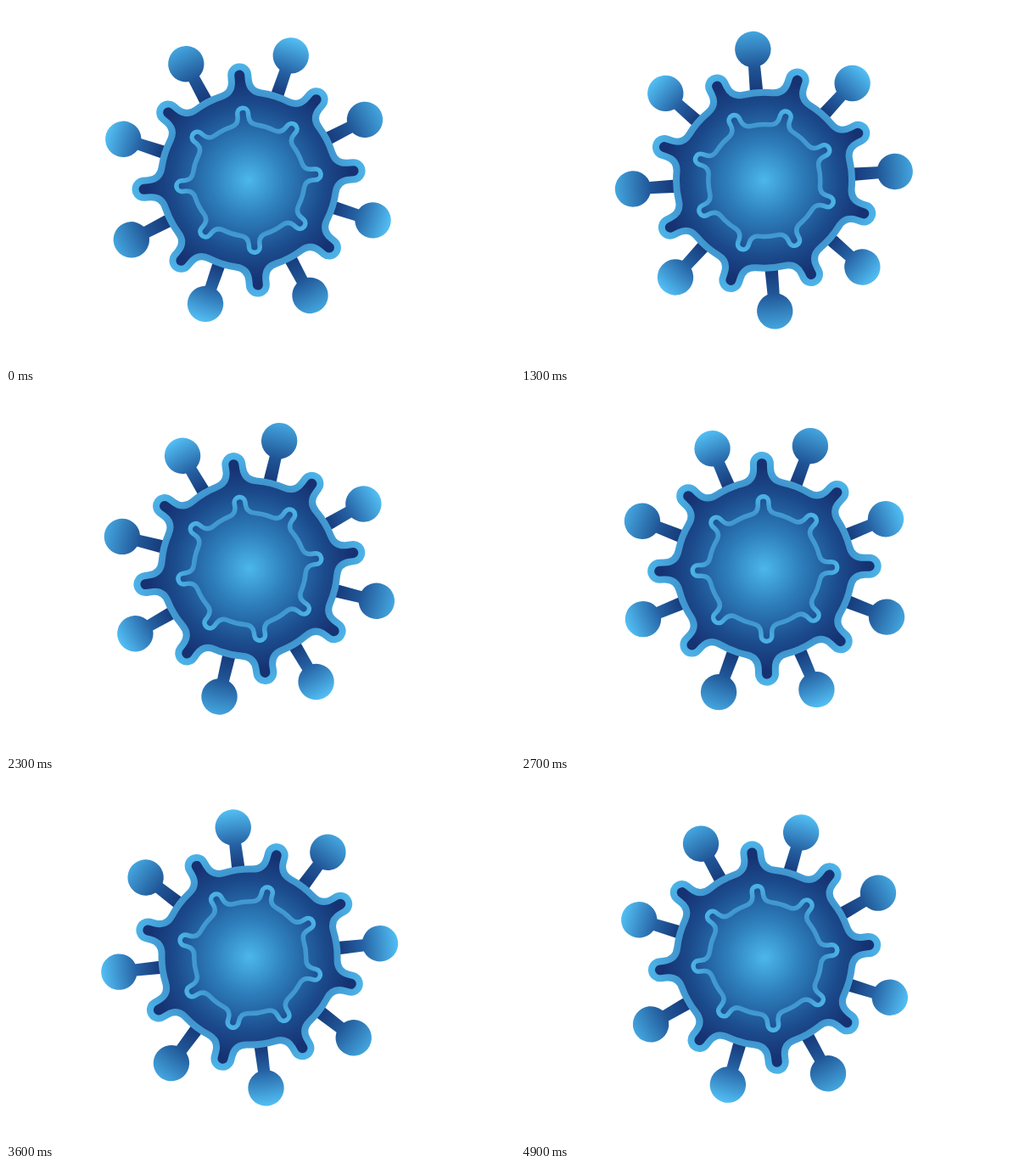
An HTML page that plays this animation: 600 by 424 pixels, repeating every 5 s.

```html
<!DOCTYPE html>
<html lang="en">
<head>
<meta charset="utf-8">
<title>Turning virus</title>
<style>
html, body { margin: 0; width: 100%; height: 100%; overflow: hidden; background: #fff; }
svg { display: block; width: 100vw; height: 100vh; }
</style>
</head>
<body>
<svg viewBox="0 0 600 424">
  <defs>
    <radialGradient id="bright" gradientUnits="userSpaceOnUse" cx="0" cy="0" r="176">
      <stop offset=".6" stop-color="#173a7a"/>
      <stop offset=".76" stop-color="#2561a3"/>
      <stop offset="1" stop-color="#53c0f5"/>
    </radialGradient>
    <radialGradient id="deep" gradientUnits="userSpaceOnUse" cx="0" cy="0" r="176">
      <stop offset=".6" stop-color="#173a7a"/>
      <stop offset=".76" stop-color="#205596"/>
      <stop offset="1" stop-color="#44a6df"/>
    </radialGradient>
    <radialGradient id="core" gradientUnits="userSpaceOnUse" cx="0" cy="0" r="120">
      <stop offset="0" stop-color="#4cb7eb"/>
      <stop offset=".37" stop-color="#2d7dba"/>
      <stop offset=".75" stop-color="#1b4a8b"/>
      <stop offset="1" stop-color="#163273"/>
    </radialGradient>
    <radialGradient id="rim" gradientUnits="userSpaceOnUse" cx="0" cy="0" r="138">
      <stop offset=".72" stop-color="#4095ce"/>
      <stop offset="1" stop-color="#4db4e9"/>
    </radialGradient>
  </defs>
  <g id="knobs"></g>
  <g id="body"><path fill="url(#core)" stroke="url(#rim)" stroke-width="8" stroke-linejoin="round"/></g>
  <g id="ring"><path transform="scale(.637)" fill="none" stroke="url(#rim)" stroke-width="8.6" stroke-linejoin="round"/></g>
</svg>
<script>
const LOOP = 5000, STEP = 100, TURN = 90;
const SPIKE_START = -5;
const TIP = 10, VALLEY = 103.5;
const KNOBS = [[-28.2, "deep"], [19, "bright"], [62.8, "deep"], [108, "bright"]];

// Each layer turns about a pivot slightly away from its own centre.
const layers = [
  { id: "knobs", pivot: [284.45, 207.15], offset: [0.95, -2.55], start: 0 },
  { id: "body", pivot: [285.7, 206.35], offset: [0.35, -1.35], start: SPIKE_START },
  { id: "ring", pivot: [285.8, 207.3], offset: [0.2, -2.1], start: SPIKE_START }
];
for (const layer of layers) layer.el = document.getElementById(layer.id);

// Eight round-ended spikes joined by shallow arcs.
function spikyPath() {
  const arc = r => `A${r} ${r} 0 0 1 `;
  let d = "";
  for (let k = 0; k < 8; k++) {
    const a = k * Math.PI / 4, c = Math.cos(a), s = Math.sin(a);
    const at = (x, y) => (x * c + y * s).toFixed(2) + " " + (x * s - y * c).toFixed(2) + " ";
    d += (k ? arc(VALLEY) : "M") + at(-23.6, 100.8);
    d += "C" + at(-15.2, 102.8) + at(-TIP, 108.4) + at(-TIP, 118);
    d += "L" + at(-TIP, 124) + arc(TIP) + at(TIP, 124) + "L" + at(TIP, 118);
    d += "C" + at(TIP, 108.4) + at(15.2, 102.8) + at(23.6, 100.8);
  }
  return d + arc(VALLEY) + "-23.6 -100.8Z";
}

const outline = spikyPath();
for (const path of document.querySelectorAll("path")) path.setAttribute("d", outline);

document.getElementById("knobs").innerHTML = [0, 180].flatMap(half =>
  KNOBS.map(([a, shade]) => `<g fill="url(#${shade})" transform="rotate(${a + half})">
    <path d="M-8 -90L-7 -138H7L8 -90Z"/><circle cy="-154.7" r="21.2"/></g>`)
).join("");

function draw(ms) {
  const time = Math.floor((ms % LOOP + 1) / STEP) * STEP;
  const angle = TURN * time / LOOP;
  for (const { el, pivot, offset, start } of layers) {
    el.setAttribute("transform",
      `translate(${pivot}) rotate(${angle}) translate(${offset}) rotate(${start})`);
  }
}

const begin = performance.now();
function tick() {
  draw(performance.now() - begin);
  requestAnimationFrame(tick);
}
tick();
</script>
</body>
</html>
```
